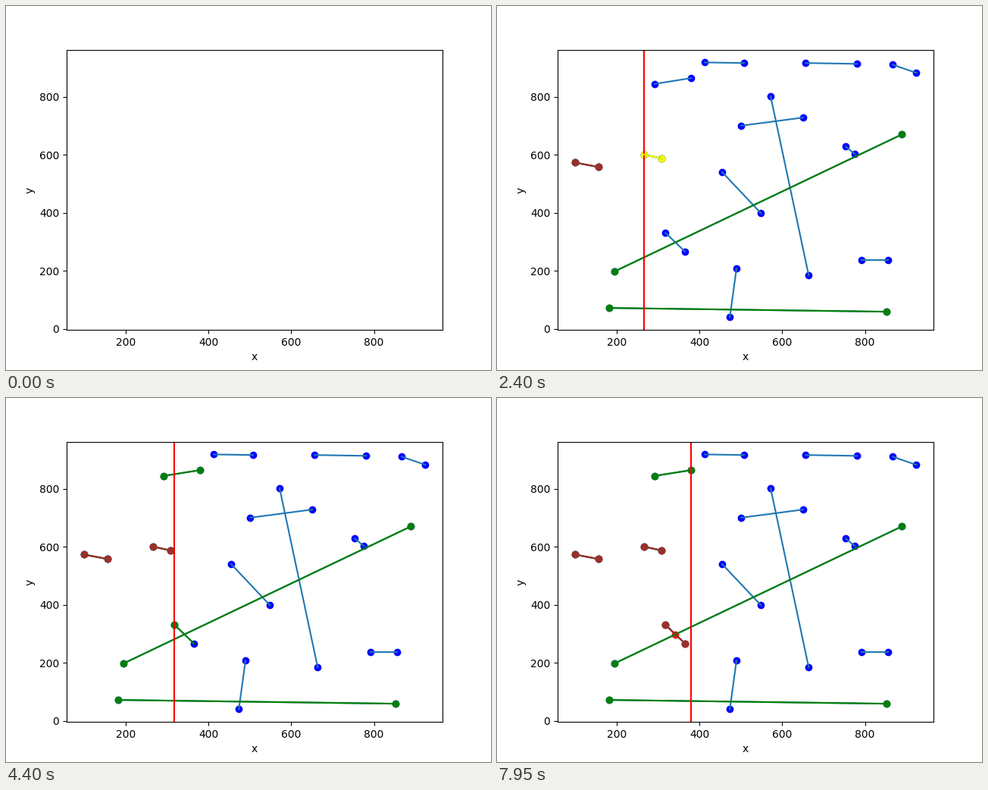
A matplotlib script for the animation above (8 s loop, 640x480 px).

```python
import matplotlib.pyplot as plt
from matplotlib.animation import FuncAnimation

FRAMES = 160
STEP_MS = 50

# Line segments as (left point, right point)
SEGMENTS = {
    "A": ((99, 573), (157, 557.5)),
    "B": ((195.5, 198), (889, 670)),
    "C": ((183, 72), (852, 59)),
    "D": ((267, 600), (309, 587)),
    "E": ((292, 844), (380.5, 864)),
    "F": ((413, 918), (508, 916)),
    "G": ((656.5, 916), (781, 913)),
    "H": ((867, 910), (924, 882)),
    "I": ((572, 801), (664, 184)),
    "J": ((501, 700), (651, 728)),
    "K": ((753.5, 628), (775.5, 602)),
    "L": ((455, 540), (549, 398)),
    "M": ((318, 331), (365.5, 266)),
    "N": ((489.5, 207), (473.5, 40)),
    "O": ((792, 236.5), (856, 236.5)),
}
CROSS = (342.2, 297.8)

# Segment entering the sweep and the step at which the sweep stops there
INSERTS = [("A", 4), ("C", 14), ("B", 18), ("D", 36), ("E", 52), ("M", 86)]
REMOVALS = [("A", 8), ("D", 68), ("M", 153)]
# Neighbour tests: lower segment, upper segment, first step
CHECKS = [("C", "B", 22), ("B", "D", 40), ("D", "E", 56), ("B", "E", 74),
          ("B", "M", 90), ("M", "E", 103), ("C", "M", 128), ("B", "E", 140)]

fig, ax = plt.subplots(figsize=(6.4, 4.8), dpi=100)
ax.set_xlabel("x")
ax.set_ylabel("y")


def span(lo, hi, margin=0.05):
    pad = (hi - lo) * margin
    return lo - pad, hi + pad


ax.set_xlim(*span(99, 924))
ax.set_ylim(*span(40, 918))

shown = []  # (artist, list of (start, stop))


def track(artist, *spans):
    artist.set_visible(False)
    shown.append((artist, list(spans)))
    return shown[-1][1]


def dot(point, color):
    return ax.scatter(*point, s=36, color=color, zorder=1)


def stroke(seg, color=None):
    (x0, y0), (x1, y1) = SEGMENTS[seg]
    return ax.plot([x0, x1], [y0, y1], color=color, lw=1.5, zorder=2)[0]


def layer(seg, color):
    """Line, left dot and right dot of a segment, each with its own spans."""
    left, right = SEGMENTS[seg]
    parts = (stroke(seg, color), dot(left, color), dot(right, color))
    return [track(part) for part in parts]


def paint(seg, color, start):
    for k, spans in enumerate(layer(seg, color)):
        spans.append((start + k, FRAMES))


def flash(spans, start, clear):
    # parts light up in order and go out in reverse
    for k, part in enumerate(spans):
        part.append((start + k, clear + 2 - k))


for seg, ends in SEGMENTS.items():
    for end in ends:
        track(dot(end, "blue"), (1, FRAMES))
    track(stroke(seg, "tab:blue"), (2, FRAMES))

for seg, t in INSERTS:
    paint(seg, "green", t + 1)

track(dot(CROSS, "red"), (102, FRAMES))

stops = [(t, SEGMENTS[seg][0][0]) for seg, t in INSERTS]
stops += [(t, SEGMENTS[seg][1][0]) for seg, t in REMOVALS]
stops += [(115, CROSS[0]), (159, SEGMENTS["E"][1][0])]
stops.sort()
sweep = ax.axvline(stops[0][1], color="red", lw=1.5, zorder=2)
track(sweep, (stops[0][0], FRAMES))

for seg, t in REMOVALS:
    paint(seg, "brown", t + 1)

yellow = {seg: layer(seg, "yellow") for seg in "BCDEM"}
for low, high, t in CHECKS:
    flash(yellow[low], t, t + 6)
    flash(yellow[high], t + 3, t + 9)


def update(i):
    for artist, spans in shown:
        artist.set_visible(any(a <= i < b for a, b in spans))
    x = [pos for t, pos in stops if t <= i] or [stops[0][1]]
    sweep.set_xdata([x[-1], x[-1]])
    return [artist for artist, _ in shown]


anim = FuncAnimation(fig, update, frames=FRAMES, interval=STEP_MS,
                     init_func=lambda: update(0), repeat=True,
                     repeat_delay=0, blit=False)
plt.show()
```
